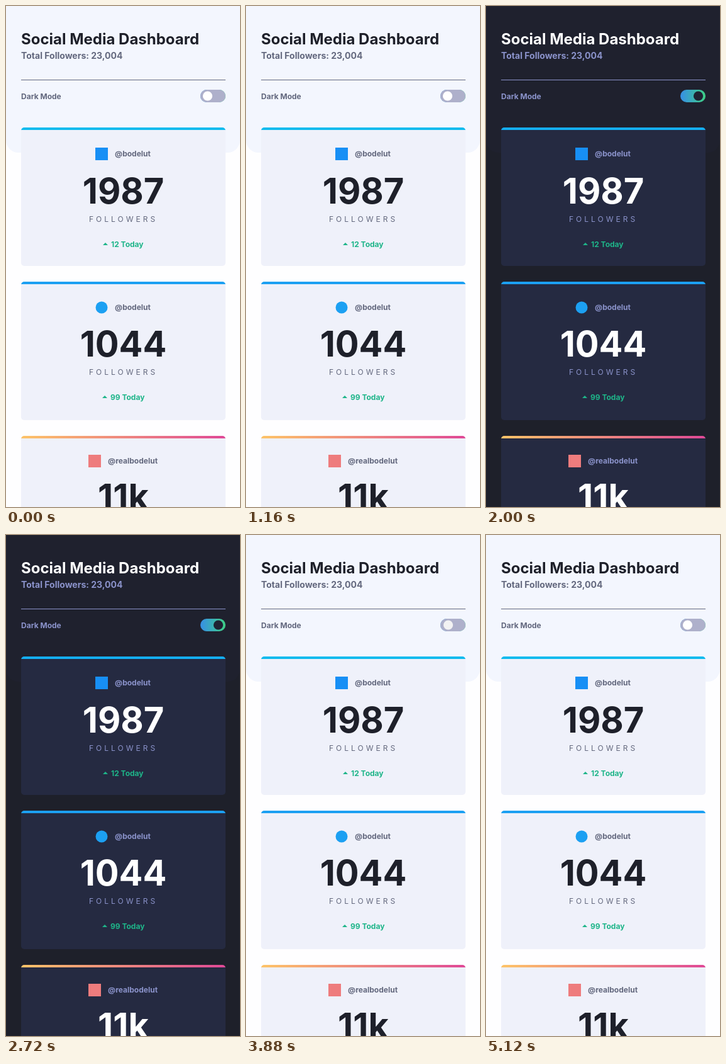
An HTML page that plays this animation: 372 px wide and 796 px high, repeating every 5200 ms.

```html
<!DOCTYPE html>
<html lang="en">
<head>
<meta charset="utf-8">
<title>Social Media Dashboard</title>
<style>
  html, body { margin: 0; width: 100%; height: 100%; overflow: hidden; }
  svg {
    --page: #fefeff; --panel: #f3f6fe; --card: #eff1fa; --title: #1e202a;
    --text: #63687e; --off: 1; --bar: #10bbee;
    display: block; background: var(--page);
    font: 700 12px Inter, sans-serif;
  }
  svg.dark {
    --page: #1e202a; --panel: #1f212e; --card: #252a41; --title: #fff;
    --text: #8b93cb; --off: 0; --bar: #14aef2;
  }
  text { fill: var(--text); }
  .panel { fill: var(--panel); }
  .card { fill: var(--card); }
  .title { fill: var(--title); font-size: 24px; }
  .total { font-size: 14px; }
  .rule { fill: var(--text); }
  .off { fill: #aeb0cb; opacity: var(--off); }
  .count { fill: var(--title); font-size: 56px; text-anchor: middle; }
  .label { font-weight: 400; letter-spacing: 4px; }
  .today, .today text { fill: #1eb589; }
</style>
</head>
<body>
<svg id="stage" width="372" height="796" viewBox="0 0 372 796">
  <defs>
    <linearGradient id="on"><stop stop-color="#378fe6"/><stop offset="1" stop-color="#3ed085"/></linearGradient>
    <linearGradient id="warm"><stop stop-color="#fdc468"/><stop offset="1" stop-color="#df4996"/></linearGradient>
    <clipPath id="round"><rect x="24" y="193" width="325" height="220" rx="5"/></clipPath>
  </defs>
  <rect class="panel" y="-30" width="372" height="263" rx="20"/>
  <text class="title" x="24" y="61">Social Media Dashboard</text>
  <text class="total" x="24" y="84">Total Followers: 23,004</text>
  <rect class="rule" x="24" y="117" width="325" height="1"/>
  <text x="24" y="148">Dark Mode</text>
  <rect x="309" y="133" width="40" height="20" rx="10" fill="url(#on)"/>
  <rect class="off" x="309" y="133" width="40" height="20" rx="10"/>
  <circle id="knob" cy="143" r="7.6"/>
  <g id="cards"></g>
  <circle id="touch" r="14.5" fill="#000" stroke="#2b2a2c" stroke-width="1.5"/>
</svg>
<script>
const LOOP = 5200, SLIDE = 300;
const DARK_AT = 1380, LIGHT_AT = 3670;
const touches = [
  { from: 1240, to: 1540, x: 342, y: 159 },
  { from: 3460, to: 3750, x: 336.5, y: 160 },
];
const square = (x, color) => `<rect x="${x}" y="225" width="20" height="20" fill="${color}"/>`;
const cards = [
  { bar: 'var(--bar)', icon: square(142, '#178ff5'), handle: '@bodelut', x: 173, count: '1987', today: '12 Today', todayX: 167 },
  { bar: '#1ca0f2', icon: '<circle cx="152" cy="235" r="9.5" fill="#1ca0f2"/>', handle: '@bodelut', x: 173, count: '1044', today: '99 Today', todayX: 166 },
  { bar: 'url(#warm)', icon: square(131, '#ee7c7d'), handle: '@realbodelut', x: 162, count: '11k', today: '', todayX: 166 },
];
const $ = id => document.getElementById(id);

$('cards').innerHTML = cards.map((c, i) => `
  <g transform="translate(0 ${i * 245})" clip-path="url(#round)">
    <rect class="card" x="24" y="193" width="325" height="220"/>
    <rect x="24" y="193" width="325" height="4" fill="${c.bar}"/>
  </g>
  <g transform="translate(0 ${i * 244})">${c.icon}<text x="${c.x}" y="239">${c.handle}</text></g>
  <g transform="translate(0 ${i * 243})">
    <text class="count" x="186.5" y="314">${c.count}</text>
    <text class="label" x="132" y="343">FOLLOWERS</text>
    <g class="today">
      <path d="M${c.todayX - 13} 380l4-4 4 4z"/>
      <text x="${c.todayX}" y="383">${c.today}</text>
    </g>
  </g>`).join('');

// CSS "ease": cubic-bezier(.25, .1, .25, 1)
function ease(x) {
  if (x <= 0) return 0;
  if (x >= 1) return 1;
  const curve = (a, b, s) => 3 * a * s * (1 - s) ** 2 + 3 * b * s * s * (1 - s) + s ** 3;
  let lo = 0, hi = 1;
  for (let i = 0; i < 20; i++) {
    const mid = (lo + hi) / 2;
    if (curve(.25, .25, mid) < x) lo = mid; else hi = mid;
  }
  return curve(.1, 1, lo);
}

const mix = (a, b, k) => a + (b - a) * k;

function draw(now) {
  const t = now % LOOP;
  $('stage').classList.toggle('dark', t >= DARK_AT && t < LIGHT_AT);

  const k = ease((t - DARK_AT) / SLIDE) - ease((t - LIGHT_AT) / SLIDE);
  $('knob').setAttribute('cx', mix(320.5, 337.5, k));
  $('knob').setAttribute('fill', `rgb(${[31, 34, 51].map(v => mix(255, v, k))})`);

  const touch = touches.find(p => t >= p.from && t < p.to);
  $('touch').setAttribute('visibility', touch ? 'visible' : 'hidden');
  if (touch) {
    $('touch').setAttribute('cx', touch.x);
    $('touch').setAttribute('cy', touch.y);
  }
}

function tick() {
  draw(performance.now());
  requestAnimationFrame(tick);
}
tick();
</script>
</body>
</html>
```
